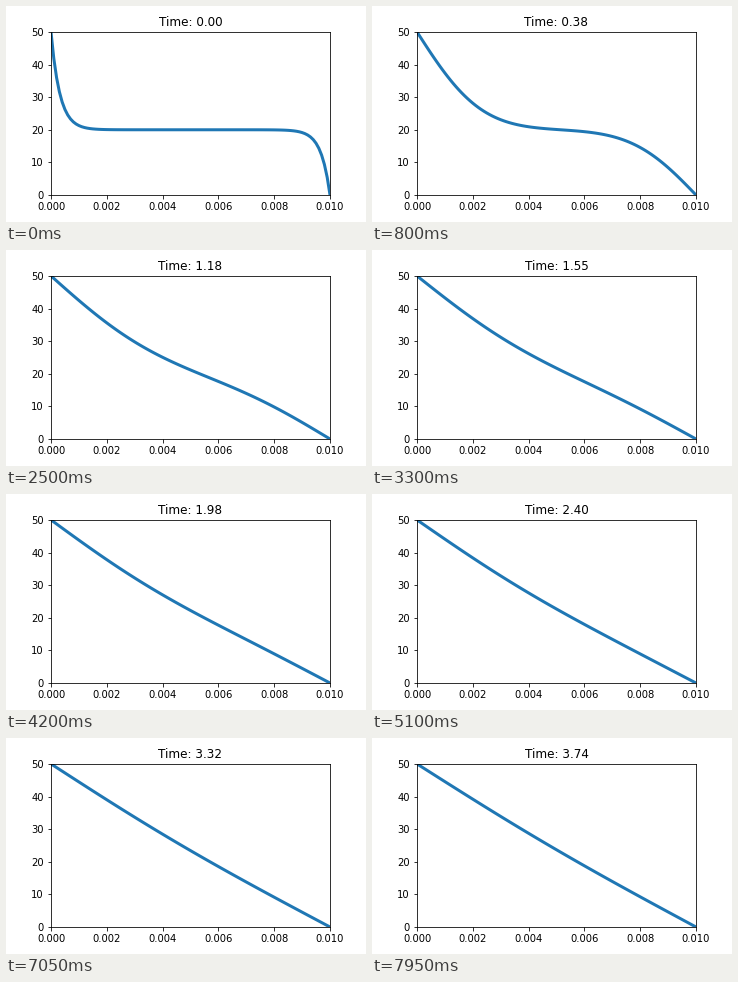
Write a matplotlib script that moves like this. It is 360 px wide and 216 px high and loops after 8000 ms.

```python
import numpy as np
import matplotlib.pyplot as plt
from matplotlib.animation import FuncAnimation

# 1D heat equation, fixed end temperatures, backward Euler in time
LENGTH = 0.01
ALPHA = 4.25e-6
CELLS = 100
T_START, T_LEFT, T_RIGHT = 20.0, 50.0, 0.0
FRAMES = 160
DT = 4 / 170

x = np.linspace(0, LENGTH, CELLS + 1)
r = ALPHA * DT / (x[1] - x[0]) ** 2


def solve():
    n = CELLS + 1
    matrix = (1 + 2 * r) * np.eye(n) - r * (np.eye(n, k=1) + np.eye(n, k=-1))
    for end in (0, -1):
        matrix[end] = 0
        matrix[end, end] = 1
    step = np.linalg.inv(matrix)
    temp = np.full(n, T_START)
    temp[0], temp[-1] = T_LEFT, T_RIGHT
    history = []
    for _ in range(FRAMES):
        temp = step @ temp
        history.append(temp)
    return history


history = solve()

fig, ax = plt.subplots(figsize=(5, 3), dpi=72)
fig.subplots_adjust(left=0.125, right=0.9, bottom=0.125, top=0.88)
ax.set_xlim(0, LENGTH)
ax.set_ylim(0, 50)
ax.set_xticks(np.linspace(0, LENGTH, 6))
ax.set_yticks(range(0, 51, 10))
line, = ax.plot(x, history[0], color="#1f77b4", lw=3)
title = ax.set_title("Time: 0.00")


def update(i):
    line.set_ydata(history[i])
    title.set_text(f"Time: {i * DT:.2f}")
    return line, title


anim = FuncAnimation(fig, update, frames=FRAMES, interval=50,
                     repeat=True, repeat_delay=0, blit=False)
plt.show()
```
